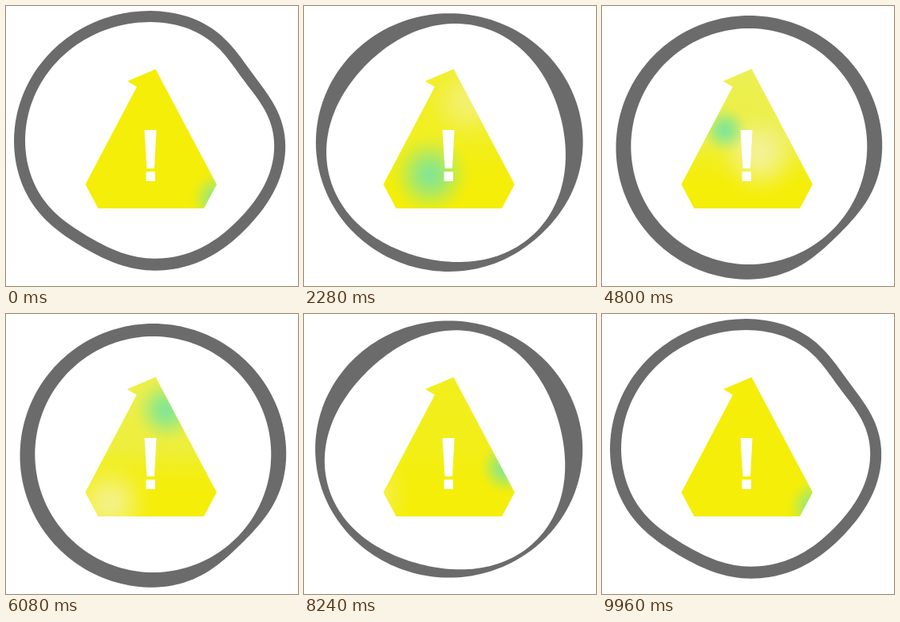
These frames come from a looping animation (366x350 px, 10000 ms). An HTML page with a canvas:

```html
<!DOCTYPE html>
<html lang="en">
<head>
<meta charset="utf-8">
<title>Warning</title>
<style>
  html, body { margin: 0; height: 100%; overflow: hidden; background: #fff; }
  canvas { display: block; }
</style>
</head>
<body>
<canvas width="366" height="350"></canvas>
<script>
const ctx = document.querySelector('canvas').getContext('2d');
const LOOP = 10000, STEP = 40, TURN = 2 * Math.PI;

const rad = degrees => degrees * TURN / 360;

// Smoothstep from time a to time b.
function ease(t, a, b) {
  const u = Math.min(1, Math.max(0, (t - a) / (b - a)));
  return u * u * (3 - 2 * u);
}

// Inward push of the outline around one angle.
function dent(angle, center, depth) {
  const offset = Math.atan2(Math.sin(angle - rad(center)), Math.cos(angle - rad(center)));
  return -depth * Math.exp(-((offset / 0.42) ** 2));
}

// An outline is an ellipse with a radial bend.
const outline = (x, y, rx, ry, bend = () => 0) => a => [
  x + (rx + bend(a)) * Math.cos(a),
  y + (ry + bend(a)) * Math.sin(a),
];

const pebble = a => dent(a, -35, 15) + dent(a, 122, 8) + dent(a, 42, 5);
const trefoil = a => 6 * Math.cos(3 * (a - rad(45)));

// Wide, leaning and round poses of both edges of the ring.
const outerPoses = [
  outline(181, 169, 171, 163, pebble),
  outline(181.7, 169, 167.5, 160.5),
  outline(184.5, 177, 167, 165, a => dent(a, 45, 10)),
];
const innerPoses = [
  outline(181, 168.5, 157, 148.5, pebble),
  outline(180.5, 174, 150, 149, trefoil),
  outline(184.3, 175.5, 148, 147.5),
];

function drawBlob(poses, weights, color) {
  ctx.beginPath();
  for (let a = 0; a < TURN; a += TURN / 180) {
    const points = poses.map(pose => pose(a));
    const mix = k => points.reduce((sum, p, i) => sum + p[k] * weights[i], 0);
    ctx.lineTo(mix(0), mix(1));
  }
  ctx.fillStyle = color;
  ctx.fill();
}

function drawRing(t) {
  const swing = Math.min(t, LOOP - t);
  const wide = 1 - ease(swing, 500, 1900), round = ease(swing, 1700, 3700);
  const weights = [wide, 1 - wide - round, round];
  drawBlob(outerPoses, weights, '#6b6b6b');
  drawBlob(innerPoses, weights, '#fff');
}

// Waypoints of the two lights: time, then x, y, radius.
const greenPath = [
  [0, 268, 242, 40], [2280, 158, 211, 54], [3680, 117, 190, 66],
  [4800, 154, 155, 32], [6080, 201, 120, 44], [8240, 253, 192, 36],
];
const palePath = [
  [0, 90, 130, 50], [2280, 205, 120, 56], [3680, 226, 143, 56],
  [4800, 198, 185, 60], [6080, 130, 236, 58], [8240, 85, 225, 56],
];

// Closed smooth path through the waypoints.
function along(path, t) {
  const n = path.length;
  const i = path.findLastIndex(p => p[0] <= t);
  const [a, b, c, d] = [-1, 0, 1, 2].map(k => path[(i + k + n) % n]);
  const u = (t - b[0]) / ((c[0] || LOOP) - b[0]);
  return [1, 2, 3].map(k => b[k] + u / 2 * (c[k] - a[k] +
    u * (2 * a[k] - 5 * b[k] + 4 * c[k] - d[k] +
    u * (3 * (b[k] - c[k]) + d[k] - a[k]))));
}

function fillSign(style) {
  ctx.fillStyle = style;
  ctx.fillRect(90, 70, 185, 190);
}

function glow([x, y, radius], rgb, alpha) {
  const light = ctx.createRadialGradient(x, y, 0, x, y, radius);
  for (let u = 0; u <= 1; u += 0.125)
    light.addColorStop(u, `rgba(${rgb},${alpha * (1 - ease(u, 0, 1))})`);
  fillSign(light);
}

function polygon(...coords) {
  ctx.beginPath();
  for (let i = 0; i < coords.length; i += 2) ctx.lineTo(coords[i], coords[i + 1]);
  ctx.closePath();
}

function drawSign(t) {
  const strength = Math.sin(Math.PI * t / LOOP);
  ctx.save();
  polygon(187.5, 79, 264, 223, 248, 253, 115.5, 253, 99.5, 223, 164, 101, 152, 94);
  ctx.clip();
  fillSign('#f5ee08');
  const haze = ctx.createLinearGradient(0, 79, 0, 228);
  haze.addColorStop(0, `rgba(235,239,84,${strength ** 2})`);
  haze.addColorStop(0.6, `rgba(235,239,76,${0.85 * strength ** 2})`);
  haze.addColorStop(1, 'rgba(240,238,24,0)');
  fillSign(haze);
  glow(along(palePath, t), '244,243,172', 0.8 * strength);
  glow(along(greenPath, t), '128,230,150', 0.95);
  ctx.restore();

  ctx.fillStyle = '#fff';
  polygon(173.5, 155, 188.5, 155, 186, 203, 176.5, 203);
  ctx.fill();
  ctx.fillRect(175.5, 207, 11.5, 12);
}

const start = performance.now();
function frame() {
  const t = Math.floor((performance.now() - start) % LOOP / STEP) * STEP;
  ctx.fillStyle = '#fff';
  ctx.fillRect(0, 0, 366, 350);
  drawRing(t);
  drawSign(t);
  requestAnimationFrame(frame);
}
frame();
</script>
</body>
</html>
```
